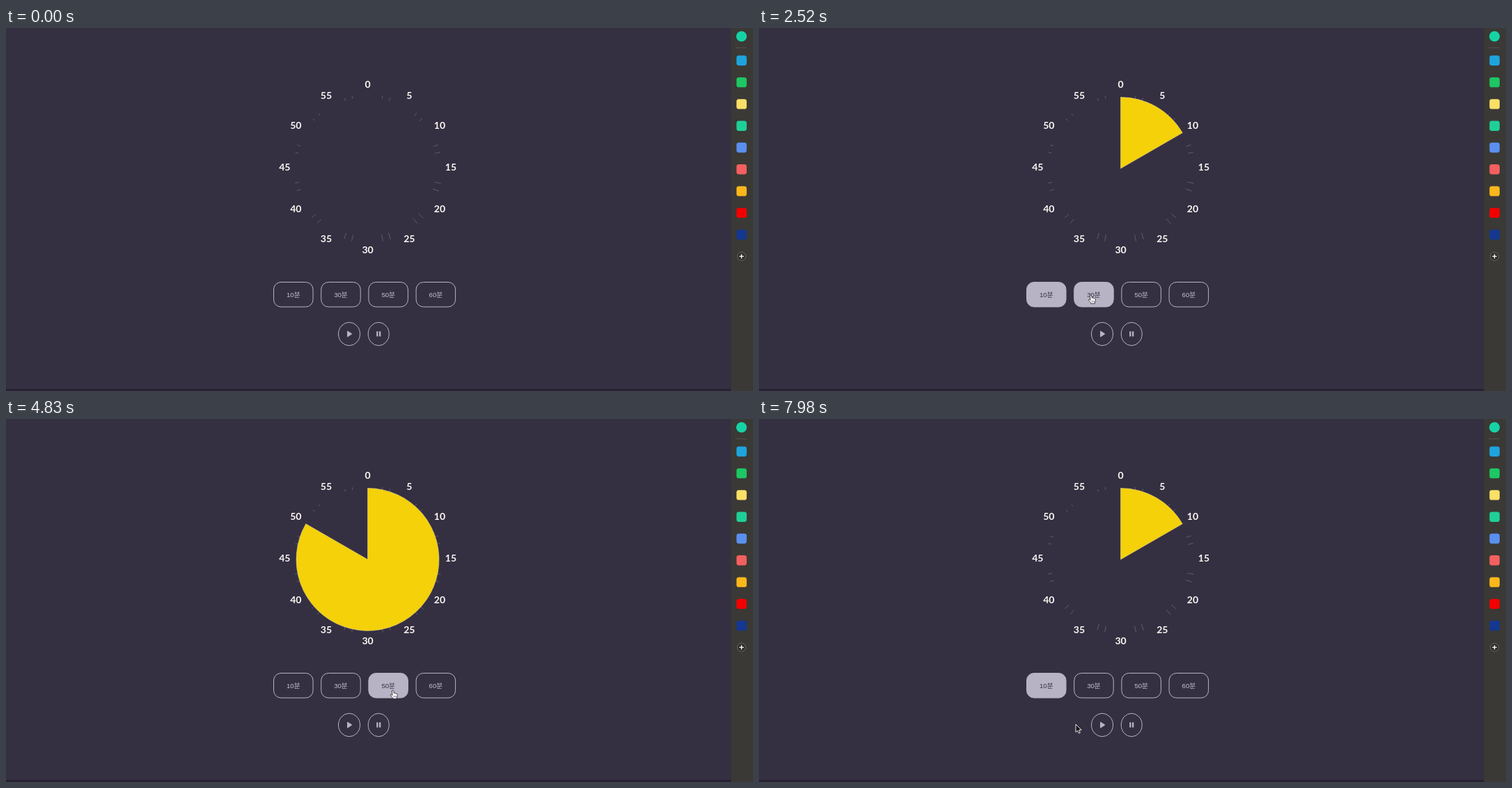
Recreate the animation shown at these times as an HTML page. Size 1073 px wide and 522 px high, loop 8000 ms.

```html
<!DOCTYPE html>
<html lang="ko">
<head>
<meta charset="utf-8">
<title>Timer</title>
<style>
  html, body { margin: 0; width: 100%; height: 100%; overflow: hidden; background: #352f42; }
  svg { display: block; width: 100vw; height: 100vh; }
  text { text-anchor: middle; }
  .number { font: 700 14px Lato, sans-serif; fill: #fbf9f3; }
  .tick { stroke: #6a6576; stroke-width: .9; opacity: .85; }
  .button rect { fill: none; stroke: #b9b3c6; }
  .button text { font: 9.6px "Liberation Sans", "Noto Sans CJK KR", "Noto Sans CJK", sans-serif; fill: #c6c0d2; }
  .button.on rect { fill: #b8b2c5; }
  .button.on text { fill: #352f42; }
  .control ellipse { fill: none; stroke: #b9b3c6; }
  .control path { fill: #b9b3c6; }
</style>
</head>
<body>
<svg id="stage" viewBox="0 0 1073 522">
  <rect width="1073" height="522" fill="#352f42"/>
  <rect y="519" width="1073" height="3" fill="#2a2034"/>
  <g id="dial"></g>
  <path id="wedge" transform="translate(519.5 202)" fill="#f4d109" stroke="#ded28a" stroke-width=".6"/>
  <g id="buttons"></g>
  <g class="control">
    <ellipse cx="493" cy="440" rx="15.5" ry="16.7"/>
    <path d="M490 436.2Q490 435.2 491 435.7L496.6 439.3Q497.4 440 496.6 440.6L491 444.2Q490 444.7 490 443.7Z"/>
    <ellipse cx="535.2" cy="440" rx="15" ry="16.7"/>
    <path d="M532.2 436.2h2.3v7.4h-2.3zM536 436.2h2.3v7.4h-2.3z"/>
  </g>
  <g id="sidebar">
    <rect x="1041.5" width="31.5" height="522" fill="#3a3936"/>
    <circle cx="1056.5" cy="12" r="7.6" fill="#16d3a6"/>
    <path d="M1048 28.5h16" stroke="#52514e"/>
    <circle cx="1056.5" cy="328.4" r="6" fill="#2f2e2c" stroke="#777571" stroke-width=".8"/>
    <path d="M1053.3 328.4h6.4M1056.5 325.2v6.4" stroke="#fff" stroke-width="1.4"/>
  </g>
  <g id="cursor" stroke-linejoin="round">
    <path id="arrow" d="M0 0V11.3L2.6 9L4.4 13L6.3 12.2L4.6 8.2H8.2Z" fill="#111" stroke="#fff" stroke-width=".9"/>
    <g id="hand" fill="#fff" stroke="#1b1822" stroke-width=".8">
      <path d="M-1.6 1Q-1.4 0-.5 0Q.5 0 .7 1L1.2 4.2Q2.5 3.5 3.1 4.6Q4.3 4.1 4.8 5.2Q6 4.9 6.2 6.2L6.3 8.6Q6 10 5.3 11V12.3H-.3V11.4Q-1.8 9.6-3.6 7.4Q-3.9 6.1-2.6 6.2L-.9 7.3Z"/>
      <path d="M1.1 8v2.5M2.8 8v2.5M4.4 8v2.5" stroke-width=".5"/>
    </g>
  </g>
</svg>
<script>
const LOOP = 8000, STEP = 70, RADIUS = 102.5;
const BUTTON = { x: 384.5, y: 365.5, width: 56.5, height: 35.5, pitch: 68.2 };
const $ = id => document.getElementById(id);

function add(parent, tag, attrs, text = '') {
  const node = document.createElementNS('http://www.w3.org/2000/svg', tag);
  for (const name in attrs) node.setAttribute(name, attrs[name]);
  node.textContent = text;
  return parent.appendChild(node);
}

// Offset from the dial centre, clockwise from the top.
function polar(radius, degrees) {
  const a = degrees * Math.PI / 180;
  return [radius * Math.sin(a), -radius * Math.cos(a)];
}

for (let k = 0; k < 12; k++) {
  const [dx, dy] = polar(119.3, k * 30);
  add($('dial'), 'text', { class: 'number', x: 519.6 + dx, y: 205.1 + dy }, k * 5);
  // Tick marks grow longer towards the lower right.
  for (const angle of [k * 30 + 12, k * 30 + 18]) {
    const half = 3.4 + 1.6 * Math.cos((angle - 150) * Math.PI / 180);
    add($('dial'), 'path', {
      class: 'tick', d: `M0 ${-103.3 - half}v${2 * half}`,
      transform: `translate(519 201) rotate(${angle})`
    });
  }
}

const buttons = [10, 30, 50, 60].map((minutes, i) => {
  const { y, width, height, pitch } = BUTTON;
  const x = BUTTON.x + i * pitch;
  const node = add($('buttons'), 'g', { class: 'button' });
  add(node, 'rect', { x, y, width, height, rx: 10.5 });
  add(node, 'text', { x: x + width / 2, y: y + 21 }, minutes + '분');
  const contains = (px, py) => px >= x && px <= x + width && py >= y && py <= y + height;
  return { minutes, node, contains };
});

['#1ea4dd', '#1dc763', '#fbe067', '#20cf98', '#5b8fee', '#f3605f', '#fbb71b', '#f20000', '#14378f']
  .forEach((fill, i) => add($('sidebar'), 'rect',
    { x: 1049.3, y: 39.6 + i * 31.3, width: 14.6, height: 14.4, rx: 3.4, fill }));

// Where the pointer rests; it eases out between stops.
const stops = [
  { from: 70, to: 70, x: 378, y: 515 },
  { from: 700, to: 700, x: 323, y: 396 },
  { from: 910, to: 1050, x: 349.5, y: 391.5 },
  { from: 1540, to: 1960, x: 402, y: 388 },
  { from: 2520, to: 3640, x: 477, y: 384 },
  { from: 3920, to: 3920, x: 497, y: 384 },
  { from: 4340, to: 4760, x: 551, y: 390 },
  { from: 4830, to: 4830, x: 556, y: 390 },
  { from: 5040, to: 5250, x: 647, y: 397 },
  { from: 5740, to: 6020, x: 621, y: 398 },
  { from: 6230, to: 6860, x: 485, y: 385 },
  { from: 7070, to: 7560, x: 420, y: 386 },
  { from: 7980, to: LOOP, x: 455, y: 439 }
];
// Time of each click and the minutes it selects.
const clicks = [[1820, 10], [3710, 30], [4830, 50], [5880, 60], [6580, 30], [7560, 10]];

function pointerAt(t) {
  const i = stops.findIndex(s => t <= s.to);
  const b = stops[i], a = stops[i - 1] || b;
  if (t >= b.from) return [b.x, b.y];
  const k = 1 - (1 - (t - a.to) / (b.from - a.to)) ** 2;
  return [a.x + (b.x - a.x) * k, a.y + (b.y - a.y) * k];
}

function wedgePath(minutes) {
  if (!minutes) return '';
  const full = minutes === 60;
  const [x, y] = polar(RADIUS, full ? 359.99 : minutes * 6);
  const begin = full ? `M0 ${-RADIUS}` : `M0 0V${-RADIUS}`;
  return `${begin}A${RADIUS} ${RADIUS} 0 ${minutes > 30 ? 1 : 0} 1 ${x} ${y}Z`;
}

function render(time) {
  const t = Math.floor((time % LOOP) / STEP) * STEP;
  const selected = clicks.reduce((last, [at, minutes]) => at <= t ? minutes : last, 0);
  const [x, y] = pointerAt(t);
  const visible = t >= stops[0].from;
  const hovered = buttons.find(b => b.contains(x, y));
  for (const b of buttons) {
    b.node.classList.toggle('on', b === hovered || b.minutes === selected);
  }
  $('wedge').setAttribute('d', wedgePath(selected));
  $('cursor').setAttribute('transform', `translate(${x} ${y})`);
  $('arrow').style.display = visible && !hovered ? '' : 'none';
  $('hand').style.display = visible && hovered ? '' : 'none';
}

const start = performance.now();
function loop() {
  render(performance.now() - start);
  requestAnimationFrame(loop);
}
loop();
</script>
</body>
</html>
```
